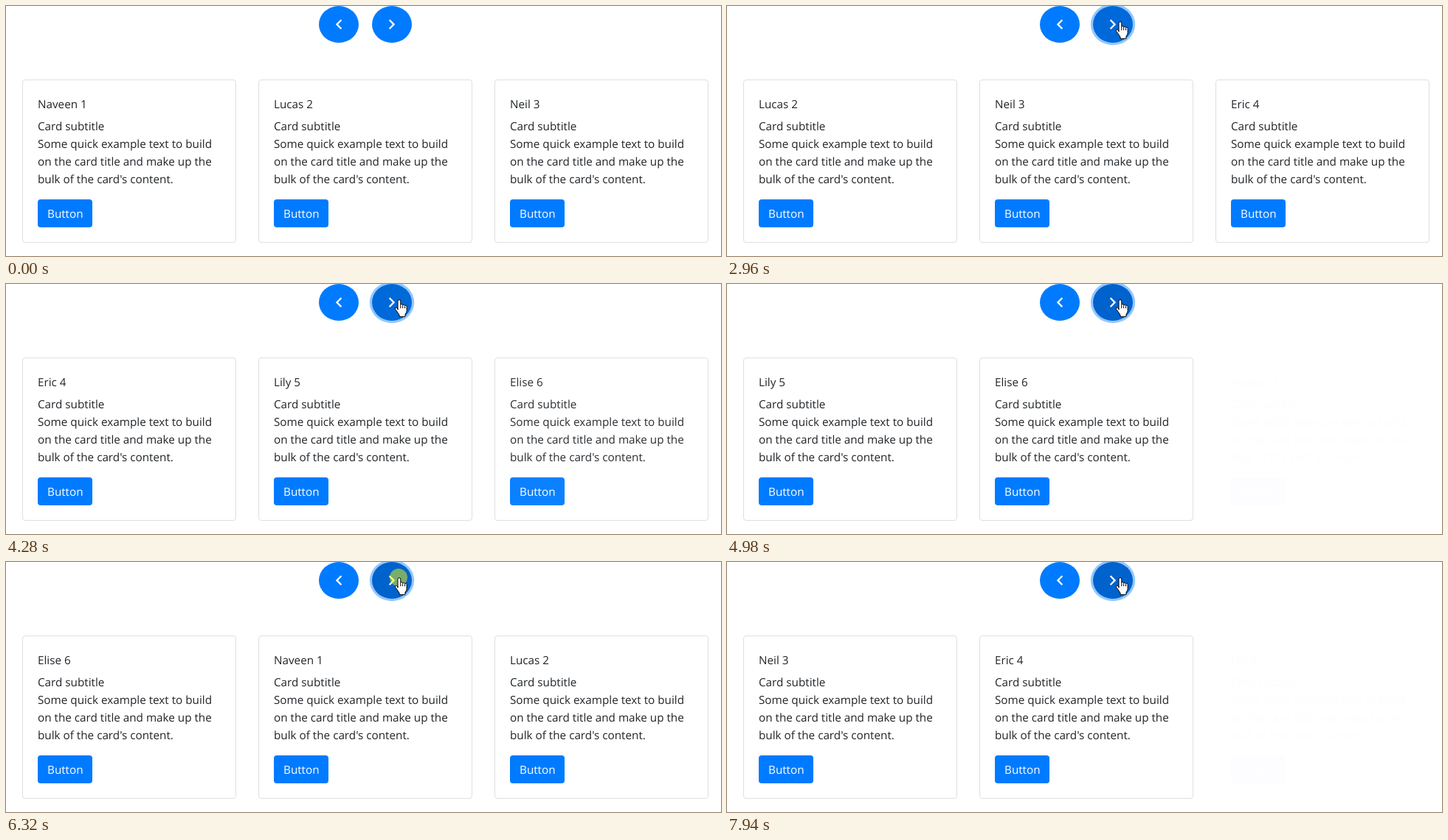
These frames come from a looping animation (969 px wide and 340 px high, 8000 ms). An HTML page:

```html
<!DOCTYPE html>
<html lang="en">
<head>
<meta charset="utf-8">
<title>Card carousel</title>
<style>
  html, body { margin: 0; width: 100%; height: 100%; overflow: hidden; background: #fff; }
  svg { display: block; width: 969px; height: 340px; }
  text { font: 15.25px "Open Sans", "Noto Sans", sans-serif; fill: #212529; text-rendering: geometricPrecision; }
  .label { fill: #fff; }
</style>
</head>
<body>
<svg viewBox="0 0 969 340">
  <ellipse cx="451" cy="25" rx="27" ry="25" fill="#007bff"/>
  <path d="M15.41 7.41 14 6l-6 6 6 6 1.41-1.41L10.83 12z" transform="translate(451 25) scale(1.12) translate(-11.7 -12)" fill="#fff"/>
  <ellipse id="ring" cx="523" cy="25" fill="#93c7ff"/>
  <ellipse id="next" cx="523" cy="25" rx="27" ry="25"/>
  <path d="M10 6 8.59 7.41 13.17 12l-4.58 4.59L10 18l6-6z" transform="translate(523 25) scale(1.12) translate(-12.3 -12)" fill="#fff"/>
  <g id="cards"></g>
  <circle id="press" cx="532" cy="21" r="12" fill="#ff0" opacity=".48"/>
  <g id="cursor" fill="#fff" stroke="#000">
    <path id="arrow" d="M.5 .5V16.5L4.2 13 6.6 18.5 8.8 17.5 6.5 12.2H11.6Z"/>
    <path id="beam" d="M-3-8H3M0-8V8M-3 8H3" fill="none"/>
    <g id="hand" transform="translate(-6)">
      <path d="M4.5 14V2.4a1.9 1.9 0 0 1 3.8 0V7.4a1.5 1.5 0 0 1 2.9.6 1.5 1.5 0 0 1 2.8.8 1.4 1.4 0 0 1 2.6 1V15.5Q16.6 18 14.5 20V23.3H6.5V21Q5 19 3.8 17L.9 13.2Q.2 11.4 2 11.2 3.2 11.2 4.5 13Z"/>
      <path d="M8.3 7.5V12M11.2 8.3V12M14 9.3V12" fill="none"/>
    </g>
  </g>
</svg>
<script>
const LOOP = 8000, STEP = 75;
const names = ["Naveen", "Lucas", "Neil", "Eric", "Lily", "Elise"];
const lines = ["Card subtitle", "Some quick example text to build",
  "on the card title and make up the", "bulk of the card's content."];
const presses = [2200, 3040, 3820, 4750, 5525, 6230, 6930, 7700];
const releases = [2425, 3270, 4050, 4980, 5770, 6470, 7170, 7940];
const BASE = [0, 123, 255], HOVER = [0, 105, 217], ACTIVE = [0, 98, 204];

const $ = id => document.getElementById(id);
const clamp = v => Math.max(0, Math.min(1, v));
const mix = (a, b, p) => a + (b - a) * p;
const blend = (a, b, p) => `rgb(${a.map((v, i) => Math.round(mix(v, b[i], p)))})`;
const show = (id, on) => $(id).setAttribute("display", on ? "inline" : "none");
const steps = (t, start) => Math.floor((t - start) / STEP);

$("cards").innerHTML = [22, 342, 662].map(x => `
  <g transform="translate(${x} 100)">
    <rect x=".5" y=".5" width="289" height="221" rx="3.5" fill="#fff" stroke="#dfdfdf"/>
    <text class="name" x="21" y="39"></text>
    ${lines.map((s, i) => `<text x="21" y="${69 + 24 * i}">${s}</text>`).join("")}
    <rect x="21" y="163" width="74" height="38" rx="4" fill="#007bff"/>
    <text class="label" x="34" y="188">Button</text>
  </g>`).join("");
const cards = [...$("cards").children];
const titles = [...document.querySelectorAll(".name")];

function drawCards(t, shift) {
  titles.forEach((el, i) => {
    const n = (shift + i) % names.length;
    const title = `${names[n]} ${n + 1}`;
    if (el.textContent !== title) el.textContent = title;
  });
  const start = releases[shift - 1];
  const fading = shift && t - start < 460;
  cards[2].setAttribute("opacity", fading ? mix(.005, .95, clamp(steps(t, start) / 3)) : 1);
}

function drawNext(t, shift) {
  const pressed = presses.filter(p => t >= p).length;
  const down = pressed > shift;
  let color;
  if (!pressed) {
    color = blend(BASE, HOVER, t < 1430 ? 0 : t < 1510 ? .5 : 1);
  } else {
    const p = down ? (1 + steps(t, presses[shift])) / 2 : 1 - steps(t, releases[shift - 1]) / 2;
    color = blend(HOVER, ACTIVE, clamp(p));
  }
  const focus = clamp((1 + steps(t, presses[0])) / 2);
  $("next").setAttribute("fill", color);
  $("ring").setAttribute("rx", 27 + 3.2 * focus);
  $("ring").setAttribute("ry", 25 + 3.2 * focus);
  show("ring", focus > 0);
  show("press", down);
}

function drawCursor(t) {
  let x = 532.5, y = t < 1510 ? 25 : 21;
  if (t < 1430) {
    const k = clamp(Math.floor((t - 600) / 76) / 10);
    const p = k * k * (3 - 2 * k);
    x = Math.round(mix(793, 531, p));
    y = Math.round(mix(288, 48, p));
  }
  const overText = x > 683 && x < 919 && y > 151 && y < 247;
  const overButton = y < 49;
  show("cursor", t >= 600);
  show("hand", overButton);
  show("beam", overText);
  show("arrow", !overButton && !overText);
  $("cursor").setAttribute("transform", `translate(${x} ${y})`);
}

function draw(now) {
  const t = now % LOOP;
  const shift = releases.filter(r => t >= r).length;
  drawCards(t, shift);
  drawNext(t, shift);
  drawCursor(t);
}

const begin = performance.now();
function tick() {
  draw(performance.now() - begin);
  requestAnimationFrame(tick);
}
tick();
</script>
</body>
</html>
```
